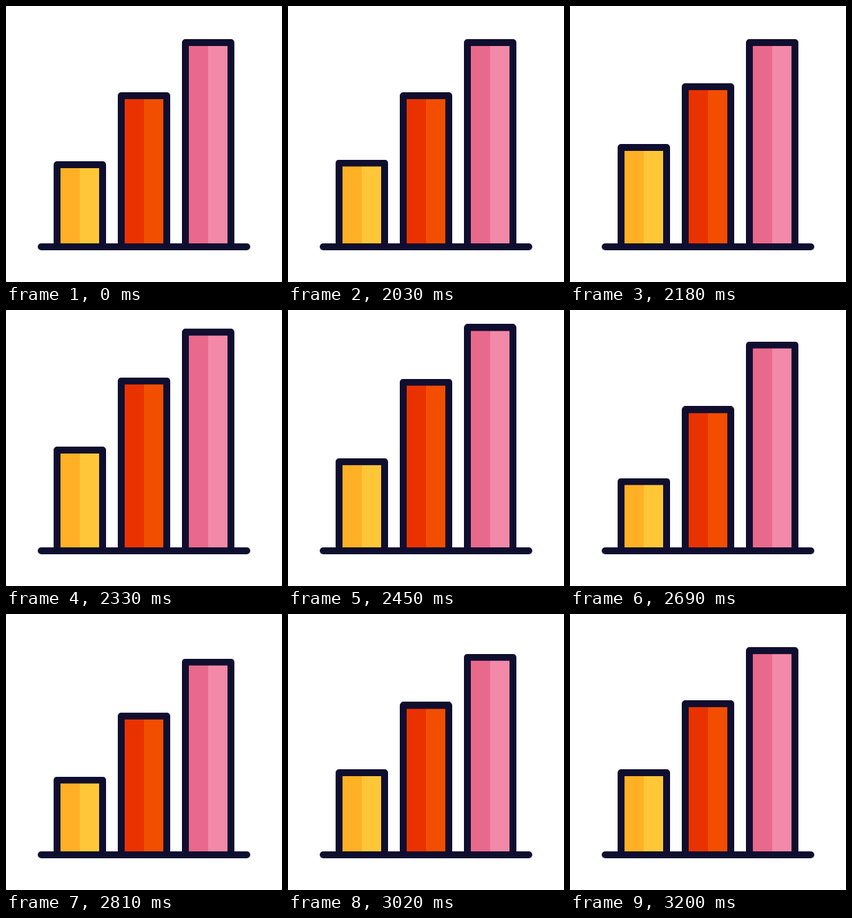
An HTML page that plays this animation: 400 px wide and 400 px high, repeating every 3.23 s.

```html
<!DOCTYPE html>
<html lang="en">
<head>
<meta charset="utf-8">
<title>Bar chart</title>
<style>
  html, body { margin: 0; width: 100%; height: 100%; overflow: hidden; background: #fff; }
  svg { display: block; width: 100%; height: 100%; }
  .outline { fill: none; stroke: #100e2f; stroke-width: 10; stroke-linejoin: round; stroke-linecap: round; }

  /* Each bar rises, sinks below its rest height and settles, one after another */
  .bar { animation: bounce 3.23s infinite; }
  .red { animation-delay: .1s; }
  .pink { animation-delay: .2s; }

  @keyframes bounce {
    0% { transform: translateY(0); }
    61.92% { transform: translateY(0); animation-timing-function: cubic-bezier(.25, .05, .2, 1); }
    71.207% { transform: translateY(-28px); animation-timing-function: cubic-bezier(.333, 0, .667, 1); }
    82.353% { transform: translateY(19px); animation-timing-function: cubic-bezier(.33, 0, .55, 1); }
    93.498%, 100% { transform: translateY(0); }
  }
</style>
</head>
<body>
<svg viewBox="0 0 400 400">
  <clipPath id="above"><rect width="400" height="349"/></clipPath>
  <g clip-path="url(#above)">
    <g class="bar yellow">
      <path fill="#ffb024" d="M74 230h33v200h-33z"/>
      <path fill="#ffc638" d="M107 230h33v200h-33z"/>
      <path class="outline" d="M74 430V230h66v200"/>
    </g>
    <g class="bar red">
      <path fill="#ea3200" d="M167 130h33v300h-33z"/>
      <path fill="#f24e00" d="M200 130h33v300h-33z"/>
      <path class="outline" d="M167 430V130h66v300"/>
    </g>
    <g class="bar pink">
      <path fill="#e9698c" d="M260 53h33v377h-33z"/>
      <path fill="#f389a8" d="M293 53h33v377h-33z"/>
      <path class="outline" d="M260 430V53h66v377"/>
    </g>
  </g>
  <path class="outline" d="M51 349H349"/>
</svg>
</body>
</html>
```
